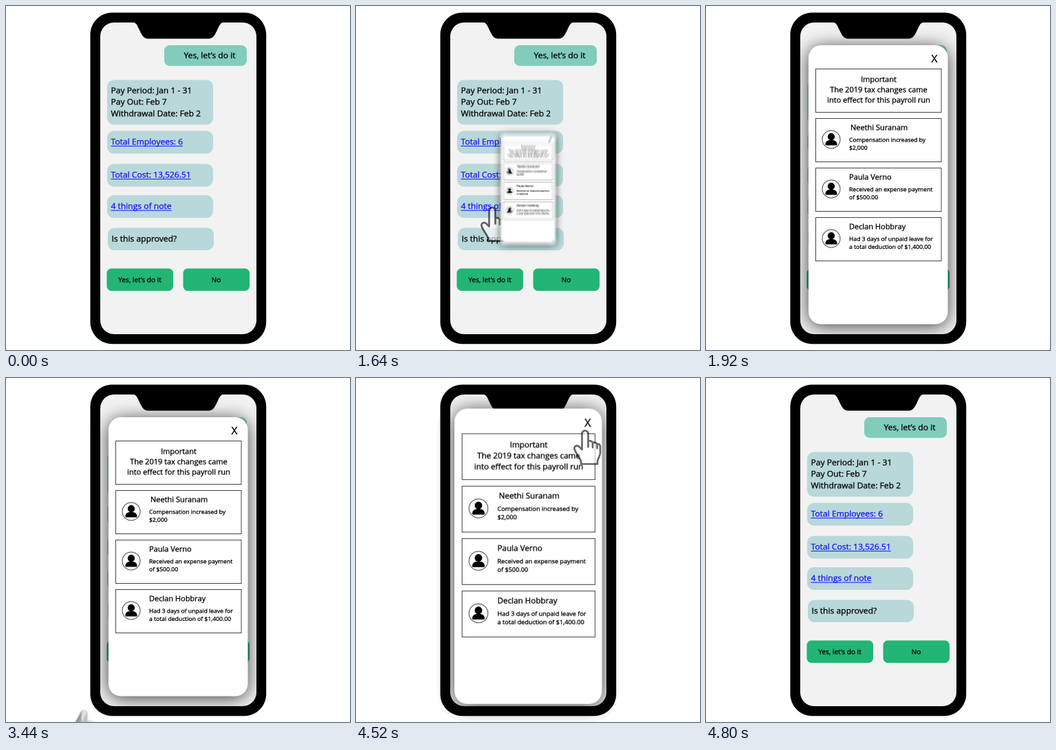
Animation of 500 by 500 pixels, one loop 5720 ms. Source, as an HTML page with a canvas:

```html
<!DOCTYPE html>
<html lang="en">
<head>
<meta charset="utf-8">
<title>Payroll chat</title>
<style>
  html, body { margin: 0; width: 100%; height: 100%; overflow: hidden; background: #fff; }
  canvas { display: block; width: 500px; height: 500px; }
</style>
</head>
<body>
<canvas id="stage"></canvas>
<script>
const LOOP = 5720, STEP = 40, SHUTTER = 20, SAMPLES = 8;

function layer(canvas, width, height, density) {
  canvas.width = width * density;
  canvas.height = height * density;
  const ctx = canvas.getContext('2d');
  ctx.scale(density, density);
  ctx.imageSmoothingQuality = 'high';
  return ctx;
}

// A picture drawn once at double density; (ox, oy) is its anchor point.
function sprite(width, height, ox, oy, draw) {
  const image = document.createElement('canvas');
  draw(layer(image, width, height, 2));
  return { image, width, height, ox, oy };
}

function box(ctx, left, top, right, bottom, radius, color) {
  ctx.fillStyle = color;
  ctx.beginPath();
  ctx.roundRect(left, top, right - left, bottom - top, radius);
  ctx.fill();
}

// A hairline stroke gives the letters a slightly heavier weight.
function text(ctx, string, x, y, size, { color = '#000', align = 'left' } = {}) {
  ctx.save();
  ctx.font = `${size}px "Open Sans", "Noto Sans", sans-serif`;
  ctx.fillStyle = ctx.strokeStyle = color;
  ctx.lineWidth = 0.3;
  ctx.textAlign = align;
  ctx.fillText(string, x, y);
  ctx.strokeText(string, x, y);
  const { width } = ctx.measureText(string);
  ctx.restore();
  return width;
}

function link(ctx, string, x, y) {
  const color = '#1414ff';
  const width = text(ctx, string, x, y, 12.1, { color });
  ctx.fillStyle = color;
  ctx.fillRect(x, y + 1.6, width, 1);
}

const chat = sprite(500, 500, 0, 0, ctx => {
  const pale = '#b9d8da', green = '#22b573';
  box(ctx, 122.5, 9.6, 378.2, 491.2, 32, '#000');
  box(ctx, 137, 24, 364, 477, 20, '#f2f2f2');
  ctx.fillStyle = '#000';
  ctx.fill(new Path2D('M183 23 C190 24 191 29 194 35 C198 43 200 47.5 207 47.5' +
    'H294 C301 47.5 303 43 307 35 C310 29 311 24 318 23 Z'));

  box(ctx, 230, 57, 350, 87, 8, '#82ccbc');
  text(ctx, 'Yes, let’s do it', 258.5, 76, 12.1);

  box(ctx, 147, 107.5, 301, 172.5, 10, pale);
  ['Pay Period: Jan 1 - 31', 'Pay Out: Feb 7', 'Withdrawal Date: Feb 2']
    .forEach((line, i) => text(ctx, line, 152.5, 127 + i * 16.7, 12.1));

  [['Total Employees: 6', 181.5], ['Total Cost: 13,526.51', 229.5], ['4 things of note', 275]]
    .forEach(([label, top]) => {
      box(ctx, 147, top, 301, top + 33, 10, pale);
      link(ctx, label, 152.5, top + 20);
    });

  box(ctx, 148, 322.5, 302, 355, 10, pale);
  text(ctx, 'Is this approved?', 153.5, 342.5, 12.1);

  box(ctx, 146.5, 381.5, 243, 414, 7, green);
  box(ctx, 257.5, 381.5, 354, 414, 7, green);
  text(ctx, 'Yes, let’s do it', 194.5, 401.5, 10.1, { align: 'center' });
  text(ctx, 'No', 305.5, 401.5, 10.1, { align: 'center' });
});

function avatar(ctx, x, y) {
  ctx.beginPath();
  ctx.arc(x, y, 13, 0, 7);
  ctx.stroke();
  ctx.fillStyle = '#000';
  ctx.beginPath();
  ctx.arc(x, y - 4, 5.2, 0, 7);
  ctx.fill();
  box(ctx, x - 8.5, y + 1, x + 8.5, y + 8.5, [6, 6, 1, 1], '#000');
}

const popup = sprite(500, 500, 250, 270, ctx => {
  ctx.shadowColor = 'rgba(0,0,0,.75)';
  ctx.shadowBlur = 52;
  ctx.shadowOffsetY = 6;
  box(ctx, 149, 57, 351.5, 462.5, 18, '#fff');
  ctx.shadowColor = 'transparent';
  ctx.strokeStyle = '#444';
  ctx.lineWidth = 1;

  text(ctx, 'X', 332, 82, 15.5, { align: 'center' });
  ['Important', 'The 2019 tax changes came', 'into effect for this payroll run']
    .forEach((line, i) => text(ctx, line, 251, 110.5 + i * 15, 11, { align: 'center' }));
  for (let i = 0; i < 4; i++) ctx.strokeRect(159.5, 91.5 + i * 72, 182.5, 63);

  [
    ['Neethi Suranam', 'Compensation increased by', '$2,000', 210],
    ['Paula Verno', 'Received an expense payment', 'of $500.00', 208],
    ['Declan Hobbray', 'Had 3 days of unpaid leave for', 'a total deduction of $1,400.00', 208],
  ].forEach(([name, first, second, x], i) => {
    const y = i * 72;
    avatar(ctx, 182, 194 + y);
    text(ctx, name, x, 180.3 + y, 11);
    text(ctx, first, 208, 197.5 + y, 8.6);
    text(ctx, second, 208, 209 + y, 8.6);
  });
});

const hand = sprite(50, 60, 20, 2, ctx => {
  ctx.translate(20, 2);
  ctx.fillStyle = '#fff';
  ctx.lineWidth = 2.6;
  ctx.lineJoin = ctx.lineCap = 'round';
  const outline = new Path2D('M-4.5 29 V6 A4.5 4.5 0 0 1 4.5 6 V17 q4 -2 6.5 2 q4 -1.5 6.5 2' +
    'q4 -1 4.5 4 V33 c0 6 -4 9 -4 14 V50 H-6 V46 C-8 40 -14 34 -15.5 28 c-1 -4 4 -6 7 -3 Z');
  ctx.fill(outline);
  ctx.stroke(outline);
  ctx.stroke(new Path2D('M4.5 17 V25 M11 19 V26 M17.5 21 V27'));
});

const progress = (t, from, to) => Math.min(1, Math.max(0, (t - from) / (to - from)));

// Poses are [x, y, scale, opacity].
const handPose = (start, x, y) => t => {
  const p = progress(t, start - 10, start + 430);
  const shown = t < start - 10 ? 0 : 1 - progress(t, start + 940, start + 1300);
  return [98 + (x - 98) * p, 510 + (y - 510) * p, 1, shown];
};
const linkHand = handPose(560, 198, 291.5);
const closeHand = handPose(3440, 333, 75);
const popupPose = t => [
  250, 270,
  progress(t, 1475, 1920) + 0.15 * progress(t, 4355, 4800),
  1 - progress(t, 4560, 4800),
];

const stage = layer(document.getElementById('stage'), 500, 500, 1);
const buffer = layer(document.createElement('canvas'), 500, 500, 1);

function place(ctx, { image, width, height, ox, oy }, [x, y, scale, opacity], weight = 1) {
  if (scale <= 0 || opacity <= 0) return;
  ctx.save();
  ctx.globalAlpha = opacity * weight;
  ctx.translate(x, y);
  ctx.scale(scale, scale);
  ctx.drawImage(image, -ox, -oy, width, height);
  ctx.restore();
}

// Averages several poses across the shutter time for motion blur.
function paint(picture, pose, t) {
  const opened = pose(t), closed = pose(t + SHUTTER);
  if (opened[3] <= 0) return;
  if ([0, 1, 2].every(i => opened[i] === closed[i])) return place(stage, picture, opened);
  buffer.clearRect(0, 0, 500, 500);
  buffer.globalCompositeOperation = 'lighter';
  for (let i = 0; i < SAMPLES; i++) {
    place(buffer, picture, pose(t + (i + 0.5) / SAMPLES * SHUTTER), 1 / SAMPLES);
  }
  stage.drawImage(buffer.canvas, 0, 0);
}

function render() {
  const t = Math.floor(performance.now() % LOOP / STEP) * STEP;
  stage.fillStyle = '#fff';
  stage.fillRect(0, 0, 500, 500);
  place(stage, chat, [0, 0, 1, 1]);
  paint(hand, linkHand, t);
  paint(popup, popupPose, t);
  paint(hand, closeHand, t);
  requestAnimationFrame(render);
}
render();
</script>
</body>
</html>
```
